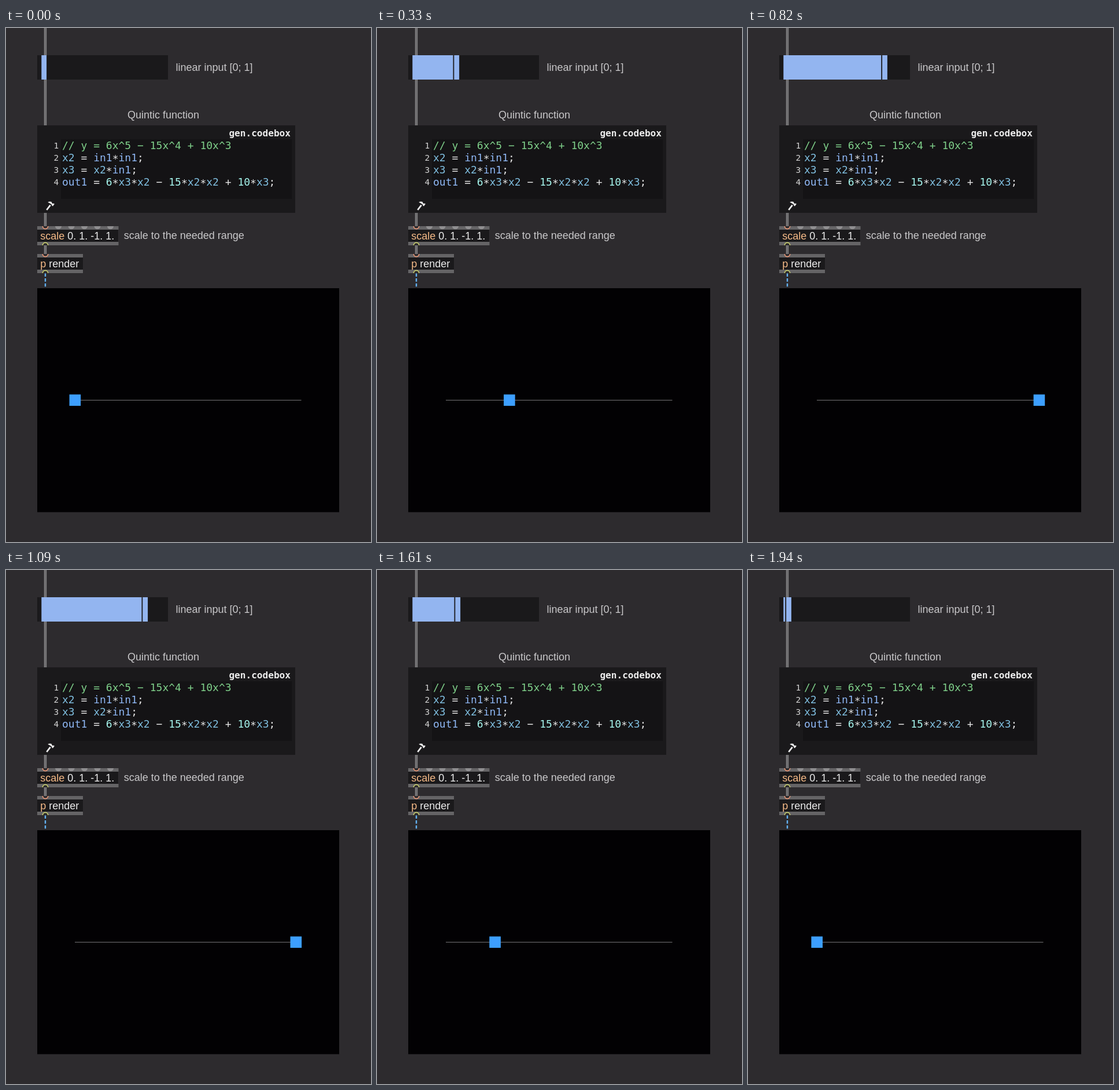
An HTML page for the animation above (1970 ms loop, 631 by 887 pixels).

```html
<!DOCTYPE html>
<html lang="en">
<head>
<meta charset="utf-8">
<title>Quintic function</title>
<style>
  html, body { margin: 0; width: 100%; height: 100%; overflow: hidden; background: #2d2b2e; }
  svg { display: block; }
  text { font: 18px "Liberation Sans", Arial, sans-serif; fill: #c9c8ca; white-space: pre; }
  .mono { font-family: "DejaVu Sans Mono", Menlo, monospace; }
  .title { font-size: 16.1px; font-weight: bold; fill: #ececec; }
  .num { font-size: 14.5px; fill: #d6d6d6; }
  .name { fill: #f6bb88; }
  .args { fill: #ececec; }
</style>
</head>
<body>
<svg id="stage" width="631" height="887" viewBox="0 0 631 887">
  <rect width="631" height="887" fill="#2d2b2e"/>
  <g id="cords"></g>

  <rect x="54" y="47" width="226" height="42" fill="#1a191b"/>
  <rect id="fill" x="61.3" y="47" height="42" fill="#93b5f0"/>
  <rect id="handle" y="47" width="8.8" height="42" fill="#93b5f0"/>
  <text x="293.5" y="74">linear input [0; 1]</text>
  <text x="210" y="156">Quintic function</text>

  <rect x="54" y="168" width="446" height="151" fill="#1a191b"/>
  <rect x="95" y="192" width="399" height="103" fill="#141315"/>
  <text class="mono title" x="492" y="187" text-anchor="end">gen.codebox</text>
  <g id="code"></g>
  <g fill="#ececec">
    <path d="M69.2 313.2L75.6 304.8L77.8 306.4L71.4 314.8Z"/>
    <path d="M72.2 300.8Q75.5 298.2 79.4 300.4L78.9 301.6L81 303.2L82.2 302.4L83.8 303.8L81 307.6L79.2 306.4L79.2 305L75.8 302.6Z"/>
  </g>

  <g id="boxes"></g>
  <text x="203.7" y="364.3">scale to the needed range</text>

  <path d="M68 423.5V449" stroke="#63b2f2" stroke-width="2.4" stroke-dasharray="5.6 3"/>
  <rect x="54" y="449" width="522" height="386.5" fill="#020103"/>
  <path d="M119 642.4H510.5" stroke="#626163" stroke-width="1.4"/>
  <rect id="square" y="632.4" width="19.6" height="19.6" fill="#3d9fff"/>
</svg>
<script>
const $ = id => document.getElementById(id);

// Patch cords
$("cords").innerHTML = [[0, 47], [89, 168], [319, 342], [375, 390]].map(([a, b]) =>
  `<path d="M68 ${a}V${b}" stroke="#858486" stroke-width="4.4"/>
   <path d="M68 ${a}V${b}" stroke="#6a696b" stroke-width="2"/>`).join("");

// Syntax-coloured code
const code = [
  "// y = 6x^5 − 15x^4 + 10x^3",
  "x2 = in1*in1;",
  "x3 = x2*in1;",
  "out1 = 6*x3*x2 − 15*x2*x2 + 10*x3;"
];
const charW = 10.837;
const colour = s =>
  s.startsWith("//") ? "#7fd08a" :
  /^x/.test(s) ? "#80bfe0" :
  /^(in|out)/.test(s) ? "#8fb8f5" :
  /^\d/.test(s) ? "#a6f6ee" : "#e4e4e4";

$("code").innerHTML = code.map((line, i) => {
  const y = 208.6 + 21 * i;
  const tokens = [...line.matchAll(/\/\/.*|x\d|(?:in|out)\d|\d+|\S/g)].map(m =>
    `<tspan x="${97 + m.index * charW}" y="${y + (m[0] === "*" ? 2.5 : 0)}" style="fill:${colour(m[0])}">${m[0]}</tspan>`);
  return `<text class="mono num" x="91.3" y="${y - 0.8}" text-anchor="end">${i + 1}</text>
    <text class="mono">${tokens.join("")}</text>`;
}).join("");

// Object boxes with inlets on top and an outlet below
const box = (y, w, name, args, inlets) => `
  <rect x="54" y="${y}" width="${w}" height="33" fill="#656466"/>
  <rect x="54" y="${y + 6}" width="${w}" height="21" fill="#1a191b"/>
  ${inlets.map(x => `<path d="M${x - 5.5} ${y}a5.5 5.2 0 0 0 11 0z" fill="#908f91"/>`).join("")}
  <path d="M63.4 ${y}a4.6 4.6 0 0 0 9.2 0" fill="#2d2b2e" stroke="#f09a78" stroke-width="1.6"/>
  <path d="M63.4 ${y + 33}a4.6 4.6 0 0 1 9.2 0" fill="#2d2b2e" stroke="#cbd36c" stroke-width="1.6"/>
  <text x="59.3" y="${y + 23}"><tspan class="name">${name}</tspan><tspan class="args"> ${args}</tspan></text>`;
$("boxes").innerHTML =
  box(342, 140.5, "scale", "0. 1. -1. 1.", [90.5, 113, 135.5, 158, 180.5]) +
  box(390, 79, "p", "render", []);

// Motion: a linear ramp up and down; the slider redraws slightly late
const loop = 1970, steps = 65;
const ramp = [[0, .036], [330, .378], [610, .657], [951, 1], [1090, .8555],
  [1390, .5465], [1610, .338], [1940, .005], [1970, .036]];
const slider = [[0, 0], [330, 72], [580, 120], [610, 120], [640, 132], [965, 202],
  [1090, 175], [1390, 115.7], [1610, 74], [1940, 4.8], [1970, 0]];

const at = (keys, t) => {
  const i = keys.findIndex(k => k[0] > t);
  const [t0, v0] = keys[i - 1], [t1, v1] = keys[i];
  return v0 + (v1 - v0) * (t - t0) / (t1 - t0);
};
const quintic = x => 6 * x ** 5 - 15 * x ** 4 + 10 * x ** 3;

function draw(now) {
  const step = Math.floor((now % loop + 5) * steps / loop) % steps;
  const t = Math.round(step * loop / steps / 10) * 10;
  const pos = at(slider, t);
  $("handle").setAttribute("x", 61.3 + pos);
  $("fill").setAttribute("width", Math.max(0, pos - 1.8));
  $("square").setAttribute("x", 109.4 + 391.5 * quintic(at(ramp, t)));
}

const start = performance.now();
function tick() {
  draw(performance.now() - start);
  requestAnimationFrame(tick);
}
tick();
</script>
</body>
</html>
```
